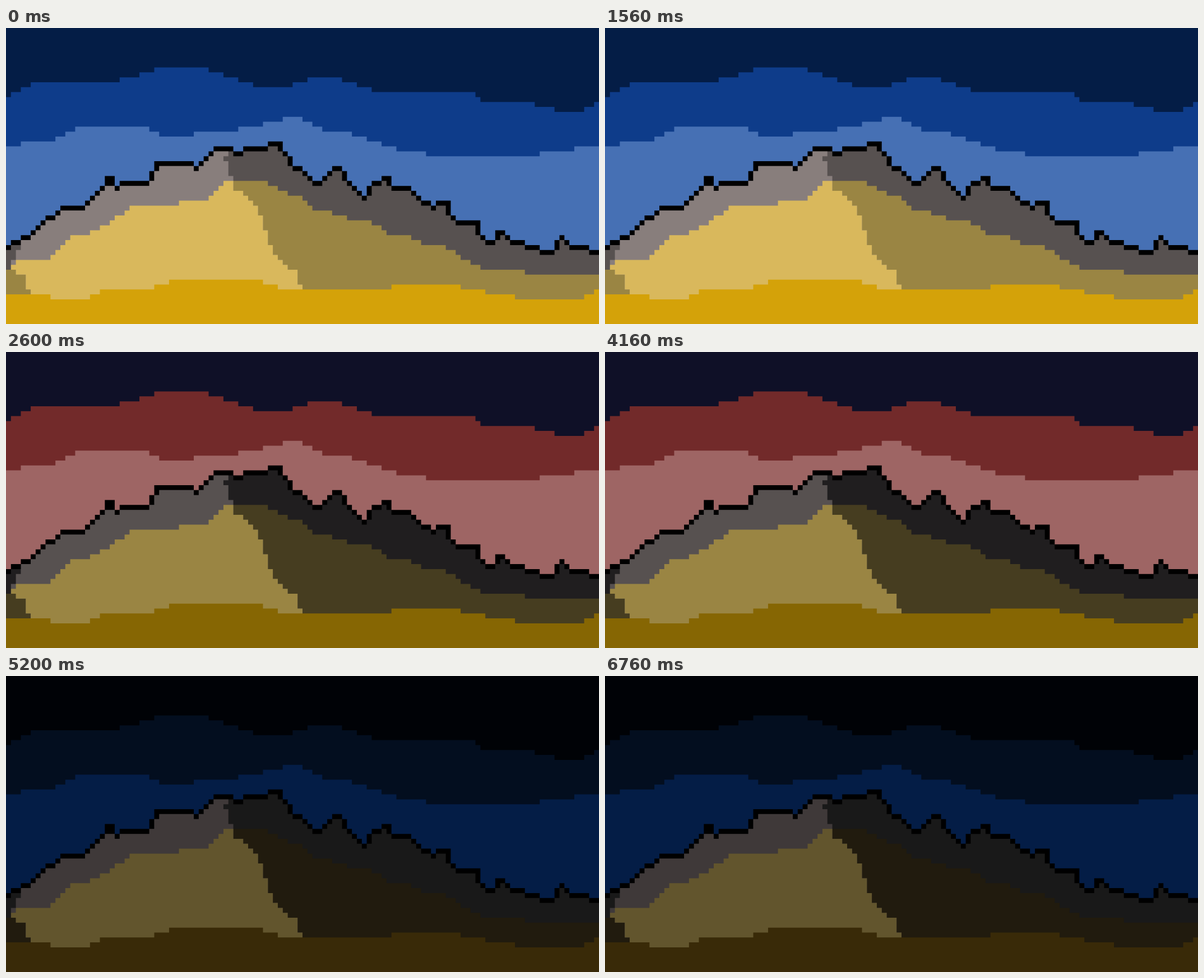
These frames come from a looping animation (1058x529 px, 7.8 s). An HTML page with a canvas:

```html
<!DOCTYPE html>
<html lang="en">
<head>
<meta charset="utf-8">
<title>Mountain by day, dusk and night</title>
<style>
  html, body { margin: 0; width: 100%; height: 100%; overflow: hidden; background: #000; }
  canvas { display: block; width: 100vw; height: 100vh; }
</style>
</head>
<body>
<canvas id="stage" width="1058" height="529"></canvas>
<script>
const COLS = 120, ROWS = 60, HOLD = 2600;
const ctx = document.getElementById('stage').getContext('2d');
ctx.scale(1058 / COLS, 529 / ROWS);

// Joins "position,value" key points with straight lines and snaps them to the grid.
function contour(text, length) {
  const points = text.trim().split(/\s+/).map(p => p.split(',').map(Number));
  return Array.from({ length }, (_, i) => {
    const next = points.findIndex(p => p[0] >= i);
    if (next < 0) return Math.round(points.at(-1)[1]);
    if (next === 0) return Math.round(points[0][1]);
    const [x0, y0] = points[next - 1], [x1, y1] = points[next];
    return Math.round(y0 + (y1 - y0) * (i - x0) / (x1 - x0));
  });
}

const haze = contour(`0,14 5,11 22,10.6 30,8.4 40,8.4 50,11.6 57,11.6 61,10.4 67,10.4
  74,12.6 94,13.4 96,14.6 106,15.4 111,16.6 116,16.6 119,15.4`, COLS);
const glow = contour(`0,23.8 9,22.6 14,20.4 28,20.4 31,21.6 37,21.6 46,20.6 56,18.4
  59,18.4 64,20.6 69,21.4 79,24.6 85,25.6 107,25.6 115,24.4`, COLS);
const ridge = contour(`0,43.8 4,41.6 8,38.4 11,36.4 15,36 19,32 20,30 21,30 22,32 23,31
  28,31 30,27 37,27 38,28 42,24.2 47,24.6 55,23.1 58,27.6 62,30.8 63,30.8 66,28 67,28.3
  72,34 73,32 77,29.8 78,32 81,32.4 86,36 87,35 89,35 90,38.3 95,39.4 96,42 98,43.4
  99,40.8 102,42.5 110,45.2 112,41.6 113,43.4 118,44.6`, COLS);
const sand = contour(`0,49 2,47 8,46.8 13,42 16,41.6 20,39.6 25,36.4 34,35.6 40,34.8
  44,31 52,31.4 57,33.6 59,34.2 62,36.6 69,38.6 73,39.4 77,41.55 81,42.4 84,43.6
  88,44.4 96,48.6 105,49.6`, COLS);
const ground = contour(`0,53.6 9,54.6 16,54.6 19,53.4 29,52.6 33,51.4 51,51.4 55,52.8
  78,52.49 91,52.4 103,54.6 116,54.6 119,53.4`, COLS);

// The outline is one cell thick, and on steep steps reaches down to its neighbours.
const rock = ridge.map((top, c) =>
  Math.max(top + 1, ridge[c - 1] ?? 0, ridge[c + 1] ?? 0));

// Sunlit span of the mountain in each row.
const litFrom = contour('44,3 48,0.8 50,4 53,4.6', ROWS);
const litTo = contour('25,45 26,44.2 32,46.4 36,51 45,54.2 49,58.5 53,60', ROWS);

// Closed area from a stepped upper edge down to the bottom of the stage.
function hill(tops) {
  const path = new Path2D();
  path.moveTo(0, ROWS);
  tops.forEach((y, c) => { path.lineTo(c, y); path.lineTo(c + 1, y); });
  path.lineTo(COLS, ROWS);
  return path;
}

function litSide() {
  const path = new Path2D();
  litTo.forEach((x, r) => { path.lineTo(x, r); path.lineTo(x, r + 1); });
  for (let r = ROWS - 1; r >= 0; r--) {
    path.lineTo(litFrom[r], r + 1);
    path.lineTo(litFrom[r], r);
  }
  return path;
}

const shapes = {
  haze: hill(haze), glow: hill(glow), ridge: hill(ridge),
  rock: hill(rock), sand: hill(sand), ground: hill(ground), lit: litSide()
};

const palettes = [
  { sky: '#041d46', haze: '#0e3c8a', glow: '#4670b4', rockLit: '#887e7c', rock: '#575150',
    sandLit: '#d9b85c', sand: '#9a8543', ground: '#d4a209' },
  { sky: '#0f1027', haze: '#722a2a', glow: '#9e6564', rockLit: '#575150', rock: '#201e1f',
    sandLit: '#9a8543', sand: '#463d20', ground: '#866603' },
  { sky: '#000206', haze: '#030e1f', glow: '#041d46', rockLit: '#3f3939', rock: '#191919',
    sandLit: '#62552d', sand: '#211b0e', ground: '#392a08' }
];

function fill(shape, color) {
  ctx.fillStyle = color;
  ctx.fill(shapes[shape]);
}

function paint(p) {
  ctx.fillStyle = p.sky;
  ctx.fillRect(0, 0, COLS, ROWS);
  fill('haze', p.haze);
  fill('glow', p.glow);
  fill('ridge', '#000');
  fill('rock', p.rock);
  fill('sand', p.sand);
  ctx.save();
  ctx.clip(shapes.lit);
  fill('rock', p.rockLit);
  fill('sand', p.sandLit);
  ctx.restore();
  fill('ground', p.ground);
}

let shown = 0;
paint(palettes[0]);
const start = performance.now();

function tick() {
  const phase = Math.floor((performance.now() - start) / HOLD) % palettes.length;
  if (phase !== shown) paint(palettes[shown = phase]);
  requestAnimationFrame(tick);
}
requestAnimationFrame(tick);
</script>
</body>
</html>
```
